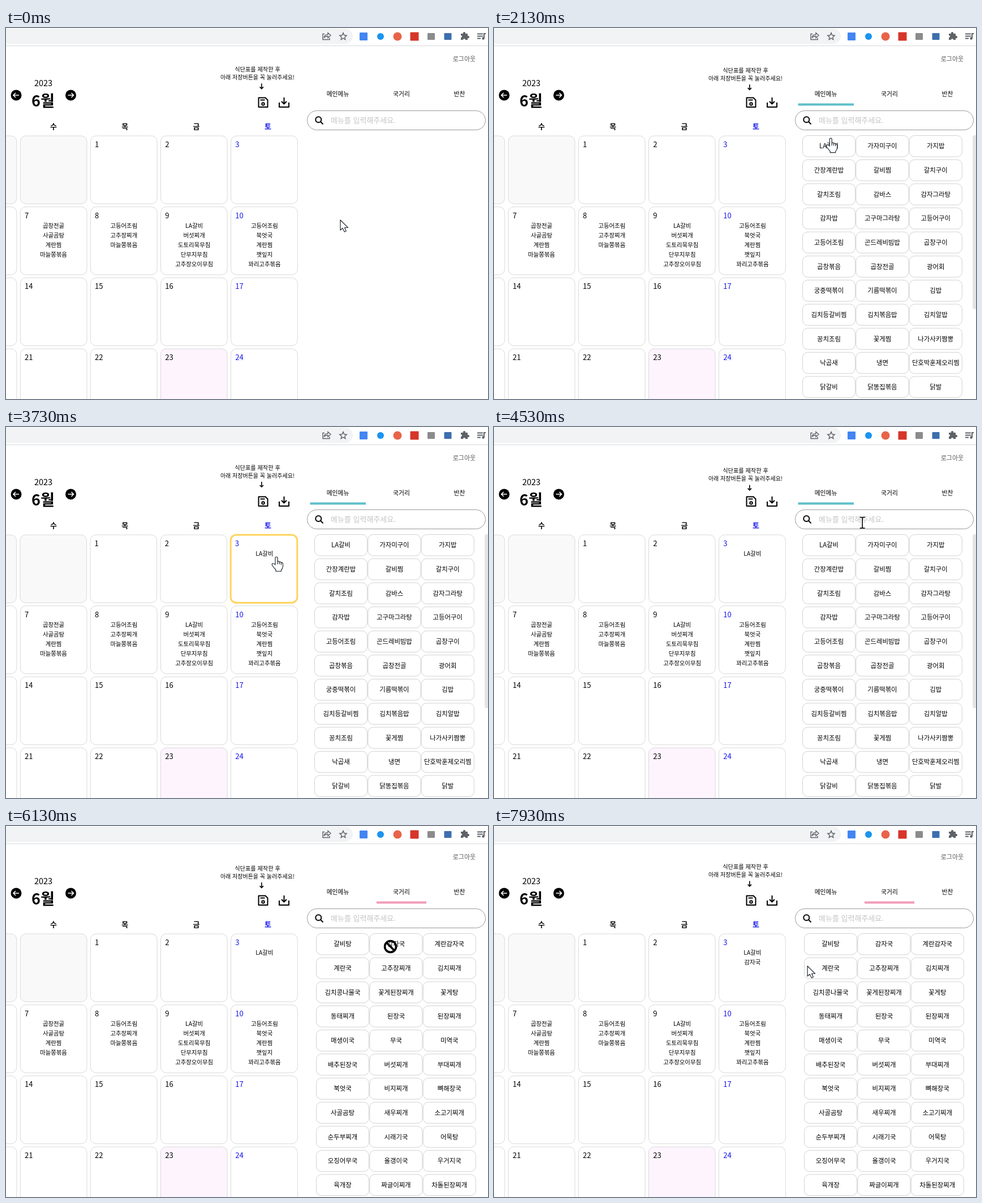
These frames come from a looping animation (852x657 px, 8 s). An HTML page:

```html
<!DOCTYPE html>
<html lang="ko">
<meta charset="utf-8">
<title>식단표</title>
<style>
  html, body { margin: 0; width: 100%; height: 100%; overflow: hidden; background: #fff; }
  svg { display: block; font-family: "Noto Sans CJK KR", "Noto Sans CJK JP", "Noto Sans", sans-serif; }
  .mid { text-anchor: middle; }
  .cell { stroke: #d9d9d9; }
  .line { fill: none; stroke: #000; stroke-width: 2; }
  .ui { fill: none; stroke: #5f6368; stroke-width: 1.4; }
  .cursor { fill: #fff; stroke: #222a33; stroke-width: 1.2; stroke-linejoin: round; }
</style>
<body>
<svg id="stage" width="852" height="657" viewBox="0 0 852 657"></svg>
<script>
const BLUE = '#1414f0';
const LOOP = 8000, STEP = 1000 / 15;

// cy is the visual middle of the line
const text = (s, x, cy, size, attrs = 'class="mid"') =>
  `<text x="${x}" y="${cy + size * .37}" font-size="${size}" ${attrs}>${s}</text>`;
const box = (x, y, w, h, r, attrs) =>
  `<rect x="${x}" y="${y}" width="${w}" height="${h}" rx="${r}" ${attrs}/>`;
const path = (d, attrs) => `<path d="${d}" ${attrs}/>`;
const dot = (x, y, r, attrs) => `<circle cx="${x}" cy="${y}" r="${r}" ${attrs}/>`;
const group = (id, body, attrs = '') => `<g id="${id}" ${attrs}>${body}</g>`;

function toolbar() {
  return box(-30, 1, 643, 27, 13.5, 'fill="#f1f3f4"') +
    box(0, 31, 852, 1, 0, 'fill="#d5d8dc"') +
    path('M563 11h-3v10h12v-3M562 18q1-6 7-6v-3l5 4.5-5 4.5v-3q-5 0-7 3z', 'class="ui" transform="translate(0 -.5)"') +
    path('M596 8.6l1.8 4.2 4.4.4-3.4 3 1 4.4-3.8-2.4-3.8 2.4 1-4.4-3.4-3 4.4-.4z', 'class="ui"') +
    box(625, 8, 14, 14, 1, 'fill="#4285f4"') +
    dot(662, 15, 6, 'fill="#1a94f0"') +
    dot(692, 15, 7.5, 'fill="#e8634a"') +
    box(714.5, 7.5, 15, 15, 1, 'fill="#d8352a"') +
    box(745, 9, 13, 12, 1, 'fill="#8b8b8b"') +
    box(774.5, 9, 13, 12, 1, 'fill="#3c6fae"') +
    path('M804 11h4a2.2 2.2 0 1 1 4 0h4v4a2.2 2.2 0 1 1 0 4v3h-4a2 2 0 0 0-4 0h-4v-4a2 2 0 0 0 0-4z', 'fill="#5f6368" transform="translate(0 -1)"') +
    path('M833 10.5h10M833 14.5h10M833 18.5h6M845 19v-9h3', 'class="ui" style="stroke-width:2"') +
    dot(843.5, 18.5, 2.2, 'fill="#5f6368"');
}

function heading() {
  const round = (x, d) => dot(x, 119, 9.5, '') +
    path(`M${x - 5 * d} 119h${10 * d}m${-4 * d} -4l${4 * d} 4l${-4 * d} 4`, 'fill="none" stroke="#fff" stroke-width="1.6"');
  return text('로그아웃', 810, 55, 11, 'class="mid" fill="#555"') +
    text('2023', 66, 98, 14.5) +
    text('6월', 65.5, 129, 27, 'class="mid" font-weight="900"') +
    round(18, -1) + round(114.5, 1) +
    path('M446.500 123.500h12l4 4v12.500h-16zM449.500 127.500h8', 'class="line" stroke-linejoin="round"') +
    dot(454.500, 134.500, 2.2, 'class="line"') +
    path('M483 132v8h17v-8M491.500 123v11m-4.500-4l4.500 4.500l4.500-4.500', 'class="line" stroke-linejoin="round"') +
    ['수', '목', '금', '토'].map((d, i) =>
      text(d, 84 + i * 126.3, 174, 13, `class="mid" font-weight="700" fill="${i == 3 ? BLUE : '#111'}"`)).join('');
}

const tip = group('tip',
  text('식단표를 제작한 후', 444.5, 75, 10.2) +
  text('아래 저장버튼을 꼭 눌러주세요!', 444.5, 89, 10) +
  path('M451.800 100v9m-3.200-3l3.200 3.200l3.200-3.200', 'class="line" style="stroke-width:1.6"'));

const meals = {
  7: '곱창전골 사골곰탕 계란찜 마늘쫑볶음',
  8: '고등어조림 고추장찌개 마늘쫑볶음',
  9: 'LA갈비 버섯찌개 도토리묵무침 단무지무침 고추장오이무침',
  10: '고등어조림 북엇국 계란찜 깻잎지 꽈리고추볶음'
};
const meal = (s, col, row, n) => text(s, 84 + col * 124.3, 224 + row * 125.8 + n * 17.2, 10.4);

function calendarRow(row) {
  let out = '';
  for (let col = -1; col < 4; col++) {
    const day = row * 7 + col, x = 25.3 + col * 124.1, y = 191 + row * 125.7;
    const empty = row == 0 && col < 1;
    out += box(x, y, 117.7, 120.3, 10,
      `class="cell" fill="${empty ? '#f9f9f9' : day == 23 ? '#fdf4fd' : '#fff'}" ${day == 3 ? 'id="target"' : ''}`);
    if (empty || col < 0) continue;
    out += text(day, x + 7.7, y + 15, 13, col == 3 ? `fill="${BLUE}"` : '');
    out += (meals[day] || '').split(' ').map((s, n) => meal(s, col, row, n)).join('');
  }
  return group('week' + row, out);
}

const mains = 'LA갈비 가자미구이 가지밥 간장계란밥 갈비찜 갈치구이 갈치조림 감바스 감자그라탕 감자밥 고구마그라탕 고등어구이 ' +
  '고등어조림 곤드레비빔밥 곱창구이 곱창볶음 곱창전골 광어회 궁중떡볶이 기름떡볶이 김밥 김치등갈비찜 김치볶음밥 김치알밥 ' +
  '꽁치조림 꽃게찜 나가사키짬뽕 낙곱새 냉면 단호박훈제오리찜 닭갈비 닭똥집볶음 닭발';
const soups = '갈비탕 감자국 계란감자국 계란국 고추장찌개 김치찌개 김치콩나물국 꽃게된장찌개 꽃게탕 동태찌개 된장국 된장찌개 ' +
  '매생이국 무국 미역국 배추된장국 버섯찌개 부대찌개 북엇국 비지찌개 뼈해장국 사골곰탕 새우찌개 소고기찌개 ' +
  '순두부찌개 시래기국 어묵탕 오징어무국 올갱이국 우거지국 육개장 짜글이찌개 차돌된장찌개';

const pills = (names, left) => names.split(' ').map((s, i) => {
  const x = left + i % 3 * 94.4, y = 190.5 + Math.floor(i / 3) * 42.65;
  return box(x, y, 93, 37.5, 9, 'fill="#fff" stroke="#d2d2d2"') + text(s, x + 46.5, y + 18.7, 11.4);
}).join('');

function panel() {
  return text('메인메뉴', 586.5, 117, 10.8) + text('국거리', 699, 117, 10.8) + text('반찬', 801.5, 117, 10.8) +
    box(532.5, 146.5, 315, 34, 17, 'fill="#fff" stroke="#999"') +
    dot(552.3, 162.2, 5, 'class="line"') + path('M556 166l4.500 4.500', 'class="line"') +
    text('메뉴를 입력해주세요.', 574, 163, 13, 'fill="#c4c4c4"') +
    group('mains', box(537.5, 133.5, 98.5, 4, 0, 'fill="#5fbfca"') + pills(mains, 545.5) +
      box(846, 190, 10, 308, 4, 'fill="#e4e4e4"')) +
    group('soups', box(655, 133.5, 88, 4, 0, 'fill="#f19cba"') + pills(soups, 548.5));
}

const cursors = {
  arrow: path('M0 0V18L4 14.500L7.300 21L10.300 19.500L7.500 13.500H13.500Z', 'class="cursor"'),
  beam: path('M-4.500 -9.500h3.500l1 1l1-1h3.500M0 -8.500v17M-4.500 9.500h3.500l1-1l1 1h3.500', 'class="line" style="stroke-width:1.6"'),
  hand: path('M-2 14V2Q-2 0 0 0Q2 0 2 2V8Q4 7 5.200 9Q7 8 8.400 10Q11.500 9.500 11.500 13V17Q11 21 8.500 23V25.500H-1V23Q-4 20 -7 15.500Q-9 12 -6 11.500Q-4 11.500 -2 14ZM2 8v5M5.200 9v4M8.400 10v4', 'class="cursor"'),
  deny: dot(0, 0, 10, 'class="line" style="stroke-width:3.6"') + path('M-7 -7L7 7', 'class="line" style="stroke-width:3.6"')
};

const $ = id => document.getElementById(id);
$('stage').innerHTML = toolbar() + heading() + tip + [0, 1, 2, 3].map(calendarRow).join('') +
  group('meal1', meal('LA갈비', 3, 0, 0)) + group('meal2', meal('감자국', 3, 0, 1)) + panel() +
  group('pointer', Object.keys(cursors).map(k => group(k, cursors[k])).join(''));

// time, x, y, cursor from then on
const track = [
  [0, 591, 340, 'arrow'], [400, 601, 250, 'arrow'], [740, 604, 166, 'beam'], [800, 604, 152, 'beam'],
  [930, 596, 132, 'hand'], [1150, 590, 117, 'hand'], [1800, 592, 122, 'hand'], [1940, 594, 150, 'beam'],
  [2070, 595, 185, 'hand'], [2130, 595, 195, 'hand'], [2400, 612, 212, 'hand'], [2730, 606, 212, 'deny'],
  [3130, 518, 230, 'arrow'], [3400, 478, 230, 'hand'], [4000, 478, 230, 'hand'], [4130, 498, 222, 'arrow'],
  [4530, 650, 170, 'beam'], [4730, 720, 140, 'hand'], [5000, 711, 119, 'hand'], [5270, 711, 119, 'hand'],
  [5400, 705, 148, 'beam'], [5530, 694, 185, 'hand'], [5730, 682, 210, 'hand'], [6060, 681, 212, 'deny'],
  [6130, 680, 213, 'deny'], [6500, 630, 275, 'deny'], [6800, 532, 290, 'deny'], [6870, 510, 284, 'arrow'],
  [7300, 465, 245, 'arrow'], [7530, 472, 246, 'arrow'], [7670, 508, 250, 'arrow'], [7930, 554, 248, 'arrow'],
  [8000, 556, 248, 'arrow']
];

function ease(p) { // cubic-bezier(.25, .1, .25, 1)
  const curve = (s, a, b) => 3 * s * (1 - s) ** 2 * a + 3 * s * s * (1 - s) * b + s ** 3;
  let lo = 0, hi = 1;
  for (let i = 0; i < 20; i++) {
    const s = (lo + hi) / 2;
    if (curve(s, .25, .25) < p) lo = s; else hi = s;
  }
  return curve(lo, .1, 1);
}

const show = (id, on) => $(id).style.display = on ? '' : 'none';

function draw(now) {
  let t = Math.floor((now % LOOP + 4) / STEP) * STEP;
  if (t > 3730 && t < 3999) t = 3733;

  const phase = (t + 170) % 2000 / 1000;
  const lift = phase < 1 ? ease(phase) : 1 - ease(phase - 1);
  $('tip').setAttribute('transform', `translate(0 ${6 * lift - 3})`);

  show('mains', t > 1260 && t < 5060);
  show('soups', t >= 5060);
  show('meal1', t > 3390);
  show('meal2', t > 7320);

  const hover = t > 3120 && t < 4200 || t > 6860 && t < 7725;
  $('week0').setAttribute('transform', `translate(${hover ? -.5 : 0} 0)`);
  $('target').setAttribute('style', hover ? 'stroke:#ffd35c;stroke-width:3' : '');

  let i = 0;
  while (i < track.length - 2 && track[i + 1][0] <= t + 5) i++;
  const [t0, x0, y0, shape] = track[i], [t1, x1, y1] = track[i + 1];
  const k = Math.max(0, Math.min(1, (t - t0) / (t1 - t0)));
  $('pointer').setAttribute('transform', `translate(${x0 + (x1 - x0) * k} ${y0 + (y1 - y0) * k})`);
  for (const name in cursors) show(name, name == shape);
}

const start = performance.now();
function tick() {
  draw(performance.now() - start);
  requestAnimationFrame(tick);
}
tick();
</script>
</body>
</html>
```
